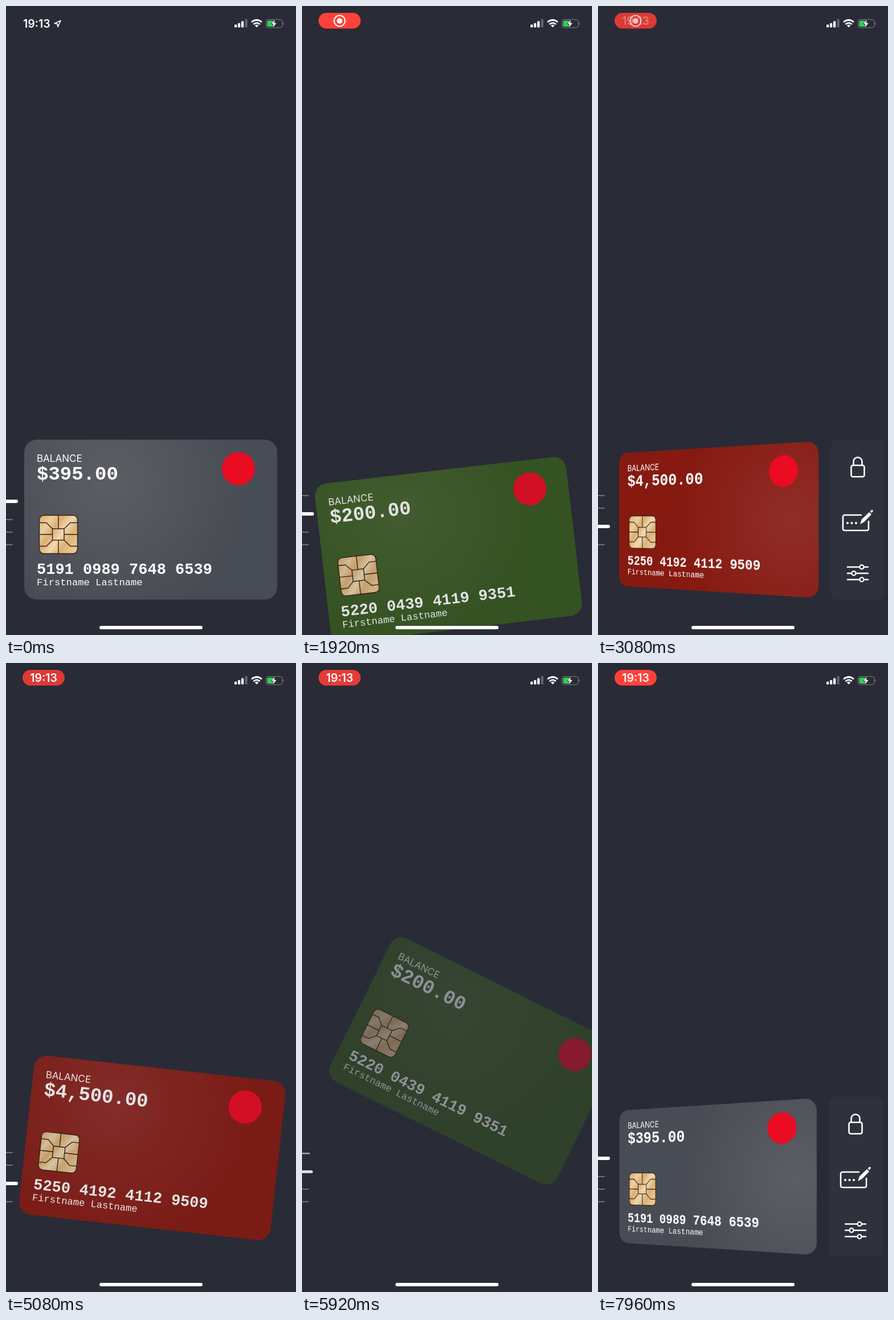
Write an HTML page that moves like this. It is 509 px wide and 1101 px high and loops after 8 s.

```html
<!DOCTYPE html>
<html lang="en">
<head>
<meta charset="utf-8">
<title>Card wallet</title>
<style>
html, body { margin: 0; width: 100%; height: 100%; overflow: hidden; background: #292b36; }
#stage { position: relative; width: 509px; height: 1101px; overflow: hidden; background: #292b36; }
svg { position: absolute; left: 0; top: 0; display: block; overflow: visible; }
.card { position: absolute; left: 32px; top: 759px; width: 444px; height: 280px; border-radius: 22px; overflow: hidden; }
.card text { fill: #fff; }
.sans { font-family: Inter, "Liberation Sans", sans-serif; }
.mono { font-family: "Liberation Mono", "DejaVu Sans Mono", monospace; }
.bold { font-weight: 700; }
#panel { position: absolute; left: 0; top: 759px; width: 94px; height: 280px; border-radius: 10px; background: #2f313c; }
.line { position: absolute; left: 0; border-radius: 0 3px 3px 0; }
#home { position: absolute; left: 164px; top: 1085px; width: 181px; height: 6px; border-radius: 3px; background: #fff; }
.clock { font-size: 19.5px; font-weight: 600; fill: #fff; }
</style>
</head>
<body>
<div id="stage">
  <div id="cards"></div>

  <div id="panel">
    <svg width="94" height="280" fill="none" stroke="#fff" stroke-width="2.6" stroke-linecap="round" stroke-linejoin="round">
      <rect x="35.5" y="45" width="23" height="20" rx="3"/>
      <path d="M39.5 45v-6.500a7.500 7.500 0 0 1 15 0V45"/>
      <path d="M53 132H24a3 3 0 0 0-3 3v21a3 3 0 0 0 3 3h39a3 3 0 0 0 3-3v-13"/>
      <g fill="#fff" stroke="none">
        <circle cx="29" cy="146" r="2.1"/><circle cx="36.500" cy="146" r="2.1"/><circle cx="44" cy="146" r="2.1"/>
        <path d="M51 148l3-8.500L67 127l4 4-12.500 13z"/>
        <path d="M68.500 125.500l3-2.500q3-.5 2 2.500l-2 3z"/>
      </g>
      <path d="M29 223H65M29 234H65M29 245H65"/>
      <g fill="#2f313c" stroke-width="2.3">
        <circle cx="54" cy="223" r="3.600"/><circle cx="40" cy="234" r="3.600"/><circle cx="54" cy="245" r="3.600"/>
      </g>
    </svg>
  </div>

  <div id="lines"></div>

  <svg width="509" height="60">
    <g id="plain">
      <text class="sans clock" x="30" y="38">19:13</text>
      <path d="M96 25.500L85 30.500l5.200.8.8 5.200z" fill="none" stroke="#fff" stroke-width="1.700" stroke-linejoin="round"/>
    </g>
    <g id="pill">
      <rect id="pillBox" x="29" y="12" width="74" height="27.500" rx="13.700"/>
      <g id="ring">
        <circle cx="66" cy="26" r="9.600" fill="none" stroke="#fff" stroke-width="2"/>
        <circle cx="66" cy="26" r="4.800" fill="#fff"/>
      </g>
      <text id="pillTime" class="sans clock" x="66" y="33" text-anchor="middle">19:13</text>
    </g>
    <g fill="#fff">
      <rect x="401" y="32.500" width="4.200" height="5" rx="1"/>
      <rect x="407" y="30" width="4.200" height="7.500" rx="1"/>
      <rect x="413" y="26.500" width="4.200" height="11" rx="1"/>
      <rect x="419.500" y="23" width="4.200" height="14.500" rx="1" fill="#62646c"/>
      <path d="M440 37.500l-3.300-3.500q3.300-2.600 6.600 0z"/>
    </g>
    <g fill="none" stroke="#fff" stroke-width="2.700">
      <path d="M431 28.300q9-7.600 18 0M434.200 32q5.800-4.700 11.600 0"/>
    </g>
    <rect x="456.500" y="23.500" width="28.500" height="14.500" rx="4" fill="none" stroke="#7c7e85" stroke-width="1.200"/>
    <path d="M486.500 28.500q2 2.200 0 4.500z" fill="#8b8d94"/>
    <rect x="458.500" y="25.500" width="13.500" height="10.500" rx="2" fill="#32d05a"/>
    <path d="M472.500 23l-7.500 8.500h4.200l-1.700 7 8-9h-4.500z" fill="#fff" stroke="#292b36" stroke-width=".8"/>
  </svg>
  <div id="home"></div>
</div>

<script>
const LOOP = 8000;
const SPACING = 90;      // degrees between cards on the wheel
const RADIUS = 456;      // card centre to wheel hub
const $ = id => document.getElementById(id);

const cards = [
  { amount: "$395.00", number: "5191 0989 7648 6539", light: "#5c5e64", dark: "#484c54" },
  { amount: "$200.00", number: "5220 0439 4119 9351", light: "#47642f", dark: "#36581f" },
  { amount: "$4,500.00", number: "5250 4192 4112 9509", light: "#902d28", dark: "#861a11" }
];

const chip = `
  <defs><linearGradient id="gold" x2="1" y2=".7">
    <stop offset="0" stop-color="#dda968"/><stop offset=".25" stop-color="#ebd0a3"/>
    <stop offset=".42" stop-color="#dcae72"/><stop offset=".62" stop-color="#f0d9b2"/>
    <stop offset=".8" stop-color="#deb277"/><stop offset="1" stop-color="#e8c794"/>
  </linearGradient></defs>
  <g transform="translate(26 132)" fill="none" stroke="#35200f" stroke-width="1.400">
    <rect x=".5" y=".5" width="67" height="67" rx="8" fill="url(#gold)"/>
    <rect x="23.500" y="24" width="20.500" height="20"/>
    <path d="M34 0V24M34 44V68M0 34H23.500M44 34H68"/>
    <path d="M0 13.500H13L23.500 24M68 13.500H55L44 24M0 54.500H13L23.500 44M68 54.500H55L44 44"/>
  </g>`;

function buildCard(card) {
  card.el = document.createElement("div");
  card.el.className = "card";
  card.el.innerHTML = `<svg width="444" height="280">
    <text class="sans" x="22" y="39" font-size="17">BALANCE</text>
    <text class="mono bold" x="22" y="70" font-size="34">${card.amount}</text>
    <circle cx="376" cy="51" r="29" fill="#eb0b23"/>
    ${chip}
    <text class="mono bold" x="22" y="234.500" font-size="27">${card.number}</text>
    <text class="mono" x="22" y="254.500" font-size="17.200">Firstname Lastname</text>
  </svg>`;
  $("cards").append(card.el);
}
cards.forEach(buildCard);

const lines = [0, 1, 2, 3].map(() => {
  const el = document.createElement("div");
  el.className = "line";
  $("lines").append(el);
  return el;
});

const linear = u => u;
const out = u => 1 - (1 - u) ** 3;
const smooth = u => u * u * (3 - 2 * u);

// Each step: time, value, easing used to get there.
const wheel = [
  [0, 0], [700, 0], [960, .084], [1560, 1, out],
  [1800, 1], [2240, .268 + 1], [2880, 2, out],
  [4960, 2], [5120, 1.907], [5750, 1, out],
  [5780, 1], [5880, .93], [6350, 0, out], [LOOP, 0]
];
const active = [
  [0, 0], [960, 0], [1560, 1, out], [2240, 1], [2880, 2, out],
  [5120, 2], [5750, 1, out], [5880, 1], [6350, 0, out], [LOOP, 0]
];
const open = [
  [0, 0], [2760, 0], [3080, .97, smooth], [3240, 1, out], [3640, 1],
  [4180, 0, smooth], [6820, 0], [7540, 1, smooth], [LOOP, 1]
];
const pillShow = [[0, 0], [280, 0], [520, 1], [LOOP, 1]];
const toClock = [[0, 0], [3000, 0], [3260, 1], [LOOP, 1]];

function at(track, t) {
  const i = track.findIndex(step => step[0] > t);
  const [t0, v0] = track[i - 1];
  const [t1, v1, ease = linear] = track[i];
  return v0 + (v1 - v0) * ease((t - t0) / (t1 - t0));
}

const mix = (a, b, k) => a + (b - a) * k;
const rgb = (a, b, k) => `rgb(${a.map((v, i) => mix(v, b[i], k)).join()})`;

function pillGlow(t) {
  if (t < 2700) return 1;
  if (t < 3080) return mix(1, .1, (t - 2700) / 380);
  if (t < 3760) return .1;
  return .5 + .5 * Math.cos((t - 7960) / 1200 * 2 * Math.PI);
}

function drawCards(t) {
  const pos = at(wheel, t);
  const q = at(open, t);
  cards.forEach((card, i) => {
    const angle = (i - pos) * SPACING;
    const alpha = Math.max(0, 1 - Math.abs(angle) / 50);
    const style = card.el.style;
    style.visibility = alpha ? "visible" : "hidden";
    style.opacity = alpha;
    let move = `translateX(${RADIUS}px) rotate(${angle}deg) translateX(${-RADIUS}px)`;
    if (q > 0) move += ` perspective(1050px) translate3d(${-65 * q}px,0,${-121 * q}px) rotateY(${-27.3 * q}deg)`;
    style.transform = move;
    style.background = `radial-gradient(circle 240px at ${mix(150, 402, q)}px ${mix(72, 142, q)}px, ${card.light}, ${card.dark})`;
  });
  $("panel").style.transform = `translateX(${405 + 133 * (1 - q)}px)`;
}

function drawLines(t) {
  const a = at(active, t);
  let shift = 0;
  lines.forEach((el, i) => {
    const w = Math.max(0, 1 - Math.abs(i - a));
    const h = 2 + 4 * w;
    el.style.top = `${856.5 + 22 * i + 10 * w + shift - h / 2}px`;
    el.style.height = `${h}px`;
    el.style.width = `${12 + 9 * w}px`;
    el.style.background = rgb([112, 114, 122], [255, 255, 255], w);
    shift += 20 * w;
  });
}

function drawStatus(t) {
  const shown = at(pillShow, t);
  const clock = at(toClock, t);
  $("plain").style.opacity = 1 - shown;
  $("pill").style.opacity = shown;
  $("pillBox").style.fill = rgb([216, 57, 53], [255, 66, 57], pillGlow(t));
  $("ring").style.opacity = 1 - clock;
  $("pillTime").style.opacity = clock;
}

function frame() {
  const t = performance.now() % LOOP;
  drawCards(t);
  drawLines(t);
  drawStatus(t);
  requestAnimationFrame(frame);
}
frame();
</script>
</body>
</html>
```
